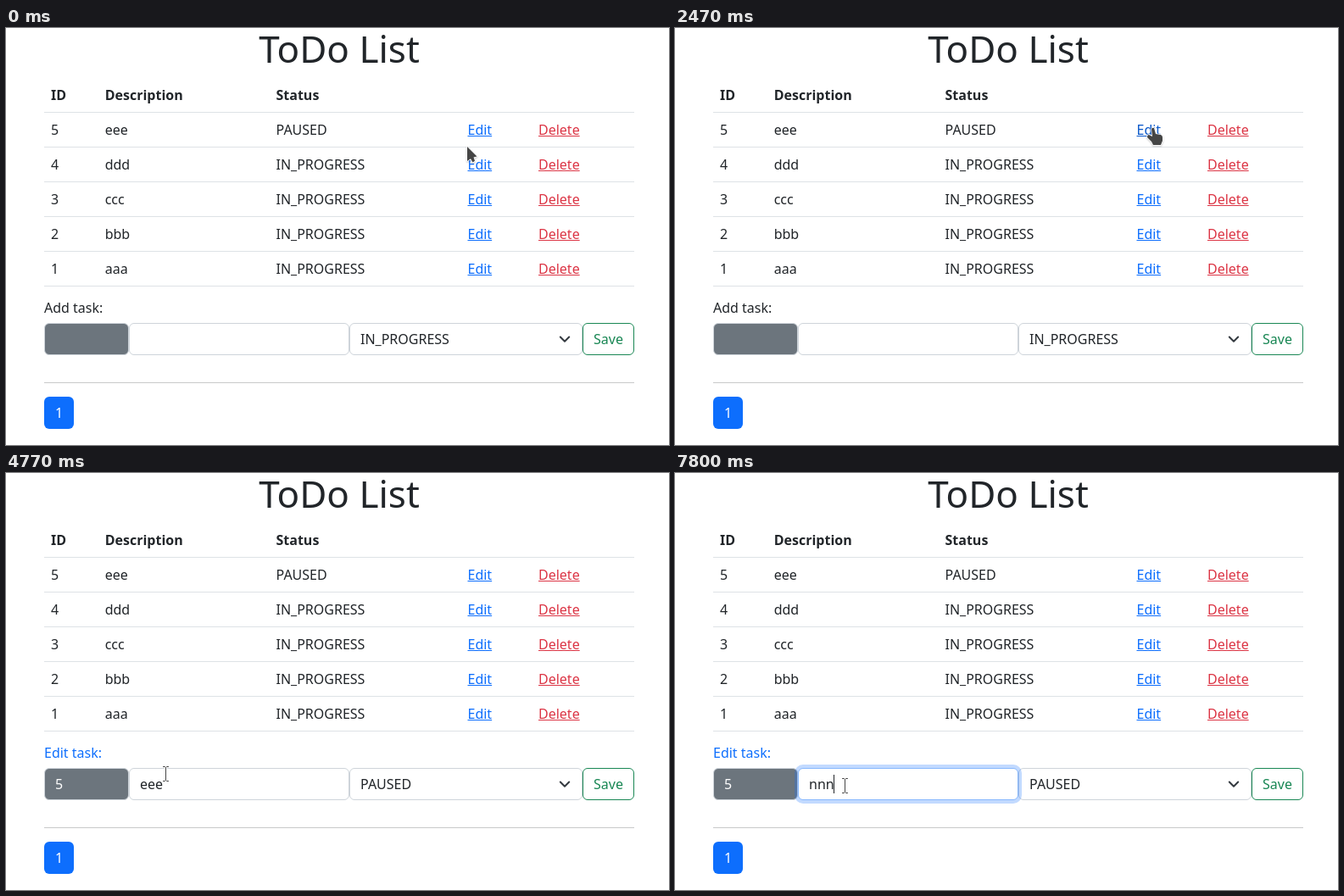
Animation, 782 px wide and 492 px high, one loop 8 s. Source, as an HTML page with a canvas:

```html
<!DOCTYPE html>
<html lang="en">
<head>
<meta charset="utf-8">
<title>ToDo List</title>
<style>
  html, body { margin: 0; width: 100%; height: 100%; overflow: hidden; background: #fff; }
  #stage {
    position: relative; width: 782px; height: 492px; overflow: hidden;
    font: 16px/24px "Noto Sans", sans-serif; color: #212529; cursor: none;
  }
  #stage > * { position: absolute; box-sizing: border-box; white-space: pre; }
  h1 {
    left: 0; top: -2.5px; width: 786px; margin: 0; text-align: center;
    font-size: 44px; font-weight: 300; line-height: 1.2;
  }
  .head { font-weight: 700; }
  .rule { left: 45px; width: 696px; height: 1px; background: #dee2e6; }
  .edit, .delete { text-decoration: underline; }
  .edit { color: #0d6efd; }
  .edit.hover { color: #0a58ca; }
  .delete { color: #dc3545; }
  #label { left: 45px; top: 318px; font-weight: 500; }
  .field {
    top: 348px; height: 38px; padding: 6px 12px;
    border: 1px solid #ced4da; border-radius: 6px; background: #fff;
  }
  #id { left: 45px; width: 100px; background: #6c757d; color: #fff; }
  #task { left: 145px; width: 260px; z-index: 1; }
  #status { left: 405px; width: 275px; }
  #save { left: 680px; width: 61px; border-color: #198754; color: #198754; }
  #page {
    left: 45px; top: 435px; width: 35px; height: 38px; border-radius: 6px;
    background: #0d6efd; color: #fff; text-align: center; line-height: 38px;
  }
  canvas { left: 0; top: 0; z-index: 2; }
</style>
</head>
<body>
<div id="stage">
  <h1>ToDo List</h1>
  <div id="label"></div>
  <div id="id" class="field"></div>
  <div id="task" class="field"></div>
  <div id="status" class="field"></div>
  <div id="save" class="field">Save</div>
  <div class="rule" style="top:418px;background:#c8c9ca"></div>
  <div id="page">1</div>
  <canvas id="overlay" width="782" height="492"></canvas>
</div>
<script>
const LOOP = 8000, FILL = 2670, FOCUS = 5130, BLINK = 600;
const COLUMNS = [53, 116.7, 318.5, 544.5, 628];
const $ = id => document.getElementById(id);
const stage = $('stage'), ctx = $('overlay').getContext('2d');

function add(className, text, x, y) {
  const el = document.createElement('div');
  el.className = className;
  el.textContent = text;
  if (x !== undefined) el.style.left = x + 'px';
  el.style.top = y + 'px';
  stage.insertBefore(el, $('overlay'));
  return el;
}

['ID', 'Description', 'Status'].forEach((name, i) => add('head', name, COLUMNS[i], 67));
add('rule', '', undefined, 99);

const links = [];
[...'edcba'].forEach((letter, row) => {
  const y = 108 + row * 41;
  const cells = [5 - row, letter.repeat(3), row ? 'IN_PROGRESS' : 'PAUSED', 'Edit', 'Delete'];
  const els = cells.map((text, i) => add(['', '', '', 'edit', 'delete'][i], text, COLUMNS[i], y));
  links.push({ el: els[3], y });
  add('rule', '', undefined, y + 32);
});

// Pointer stops: time, x, y
const path = [
  [0, 544, 140], [370, 544, 140], [640, 573, 138], [930, 571, 143], [1070, 571, 143],
  [1420, 531, 140], [1770, 547, 138], [1870, 549, 139], [1900, 549, 139],
  [2150, 519, 149], [2470, 564, 118], [3000, 564, 118], [3370, 158, 311],
  [3800, 59, 338], [3870, 53, 338], [4030, 53, 338], [4400, 103, 336], [4570, 103, 336],
  [4770, 188, 355], [5060, 219, 372], [5730, 219, 372], [6000, 200, 369], [LOOP, 200, 369]
];

const slope = (i, axis) =>
  (path[i + 1][axis] - path[i][axis]) / (path[i + 1][0] - path[i][0]);

function tangent(i, axis) {
  if (i === 0 || i === path.length - 1) return 0;
  const a = slope(i - 1, axis), b = slope(i, axis);
  return a * b <= 0 ? 0 : 2 * a * b / (a + b);
}

function pointerAt(t) {
  const i = Math.max(0, path.findIndex(p => p[0] > t) - 1);
  const span = path[i + 1][0] - path[i][0], u = (t - path[i][0]) / span;
  const ease = u * u * (3 - 2 * u);
  return [1, 2].map(axis =>
    path[i][axis] + (path[i + 1][axis] - path[i][axis]) * ease +
    span * u * (1 - u) * ((1 - u) * tangent(i, axis) - u * tangent(i + 1, axis)));
}

const arrow = new Path2D('M0 0L11.5 11.5L7.5 12.5L9 16.8L6.5 18.6L4 14.2L0 17Z');
const hand = new Path2D('M-2 1Q-1-1 1 0L3 7L9 8Q11 9 11 11L11 15L9 20L0 20L-2 16L-7 11' +
  'Q-7 8-5 8L-1 10Z');
const beam = new Path2D('M-3-8.5H-1L0-7.5L1-8.5H3M0-7.5V7.5M-3 8.5H-1L0 7.5L1 8.5H3');

function drawPointer(x, y, shape) {
  ctx.save();
  ctx.translate(Math.round(x), Math.round(y));
  ctx.lineJoin = 'round';
  if (shape === beam) {
    ctx.translate(0.5, 0);
    ctx.strokeStyle = 'rgba(255,255,255,.9)';
    ctx.lineWidth = 3;
    ctx.stroke(beam);
    ctx.strokeStyle = '#454545';
    ctx.lineWidth = 1;
    ctx.stroke(beam);
  } else {
    ctx.shadowColor = 'rgba(0,0,0,.25)';
    ctx.shadowBlur = 2;
    ctx.shadowOffsetY = 1;
    ctx.strokeStyle = '#fff';
    ctx.lineWidth = 1.6;
    ctx.stroke(shape);
    ctx.shadowColor = 'transparent';
    ctx.fillStyle = '#454545';
    ctx.fill(shape);
  }
  ctx.restore();
}

function drawChevron() {
  ctx.strokeStyle = '#343a40';
  ctx.lineWidth = 2;
  ctx.lineCap = ctx.lineJoin = 'round';
  ctx.stroke(new Path2D('M653.8 364.5L659 369.7L664.2 364.5'));
}

function taskText(t) {
  if (t < FILL) return '';
  if (t < 6970) return 'e'.repeat(3 - [6670, 6820].filter(k => k <= t).length);
  return 'n'.repeat([7430, 7600, 7800].filter(k => k <= t).length);
}

function setText(id, text) {
  if ($(id).textContent !== text) $(id).textContent = text;
}

function render(t) {
  const editing = t >= FILL, text = taskText(t);
  setText('label', editing ? 'Edit task:' : 'Add task:');
  $('label').style.color = editing ? '#0d6efd' : '';
  setText('id', editing ? '5' : '');
  setText('task', text);
  setText('status', editing ? 'PAUSED' : 'IN_PROGRESS');

  const u = Math.min(1, Math.max(0, (t - FOCUS) / 150));
  const glow = u * (2 - u);
  const mix = (a, b) => Math.round(a + (b - a) * glow);
  $('task').style.borderColor = `rgb(${mix(206, 134)},${mix(212, 183)},${mix(218, 254)})`;
  $('task').style.boxShadow = `0 0 0 ${4 * glow}px rgba(13,110,253,${0.25 * glow})`;

  ctx.clearRect(0, 0, 782, 492);
  drawChevron();

  const blinkOn = t >= 6670 || Math.floor((t - FOCUS) / BLINK) % 2 === 0;
  if (t >= FOCUS && blinkOn) {
    ctx.font = '16px "Noto Sans", sans-serif';
    ctx.fillStyle = '#212529';
    ctx.fillRect(Math.floor(158 + ctx.measureText(text).width), 356, 1, 22);
  }

  const [x, y] = pointerAt(t);
  let shape = arrow;
  links.forEach(link => {
    const over = x >= 544 && x <= 574 && y >= link.y + 1 && y <= link.y + 23;
    link.el.classList.toggle('hover', over);
    if (over) shape = hand;
  });
  const onLabel = x >= 45 && x <= 116 && y >= 320 && y <= 341;
  const onTask = x >= 145 && x <= 405 && y >= 348 && y <= 386;
  if (onLabel || onTask) shape = beam;
  drawPointer(x, y, shape);
}

const start = performance.now();
function tick() {
  render((performance.now() - start) % LOOP);
  requestAnimationFrame(tick);
}
tick();
</script>
</body>
</html>
```
